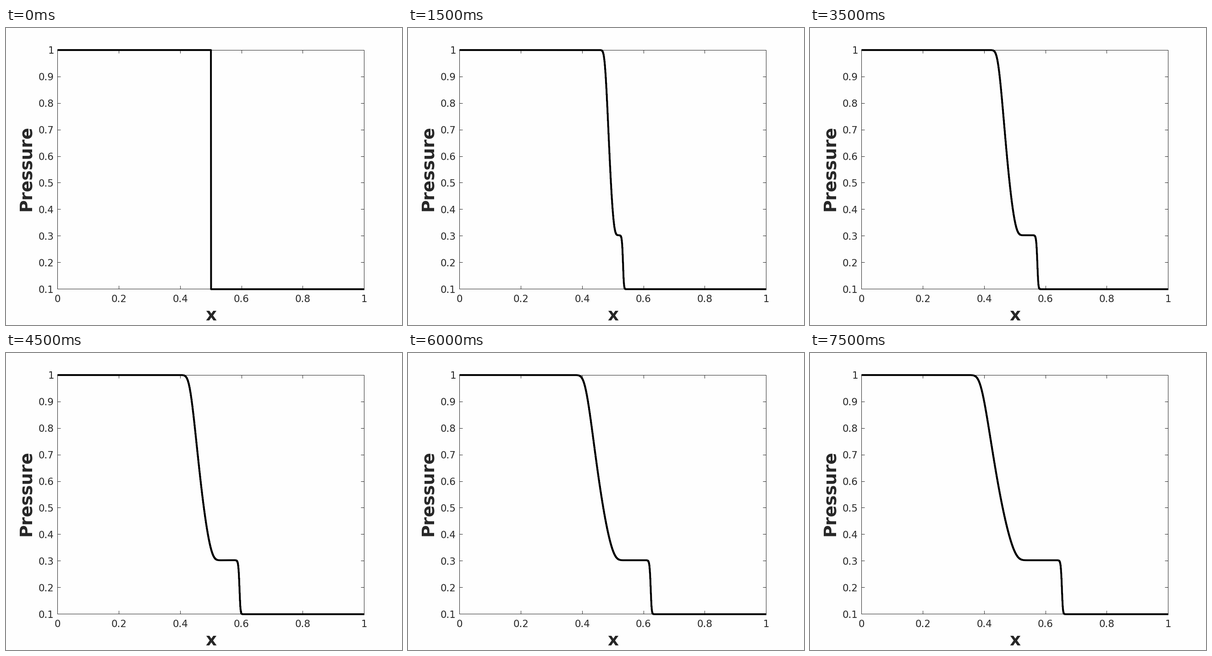
These frames come from a looping animation (864x648 px, 8 s). A matplotlib script:

```python
import numpy as np
import matplotlib.pyplot as plt
from matplotlib.animation import FuncAnimation

W, H, DPI = 864, 648, 96
PX = 72 / DPI
LEFT, RIGHT, TOP, BOTTOM = 112.3, 781.9, 48.1, 569.9
INK = "#262626"
PAPER = "#fefefe"
FRAMES, INTERVAL = 16, 500

GAMMA = 1.4
CELLS, CFL, STEPS = 2000, 0.5, 50

plt.rcParams["font.family"] = "DejaVu Sans"
fig = plt.figure(figsize=(W / DPI, H / DPI), dpi=DPI, facecolor=PAPER)
ax = fig.add_axes([0, 0, 1, 1])
ax.set_xlim(0, W)
ax.set_ylim(H, 0)
ax.axis("off")


def to_x(x):
    return LEFT + (RIGHT - LEFT) * np.asarray(x)


def to_y(p):
    return BOTTOM - (BOTTOM - TOP) * (np.asarray(p) - 0.1) / 0.9


def stroke(xs, ys):
    """Hairline on whole pixel rows and columns."""
    ax.plot(np.floor(xs) + 0.2, np.floor(ys) + 0.2, color=INK, lw=PX,
            solid_capstyle="butt", snap=True)


def label(x, y, text, size, **kw):
    ax.text(x, y, text, fontsize=size * PX, color=INK, ha="left",
            va="baseline", **kw)


def number_width(text, size):
    return size * (0.636 * len(text) - 0.318 * text.count("."))


def draw_axes(size=21.33, tick=7):
    for x in (LEFT, RIGHT):
        stroke([x, x], [TOP, BOTTOM])
    for y in (TOP, BOTTOM):
        stroke([LEFT, RIGHT], [y, y])
    for v in np.linspace(0, 1, 6):
        x, text = to_x(v), f"{v:.1g}"
        stroke([x, x], [BOTTOM, BOTTOM - tick])
        stroke([x, x], [TOP, TOP + tick])
        label(x - number_width(text, size) / 2, 598, text, size)
    for v in np.linspace(0.1, 1, 10):
        y, text = to_y(v), f"{v:.1g}"
        stroke([LEFT, LEFT + tick], [y, y])
        stroke([RIGHT, RIGHT - tick], [y, y])
        label(104.9 - number_width(text, size), y + 7.9, text, size)
    label(435, 638, "x", 37.33, weight="bold")
    label(54.5, 399, "Pressure", 37.33, weight="bold", rotation=90,
          rotation_mode="anchor")


def shock_tube():
    """Pressure snapshots of a shock tube, Lax-Friedrichs scheme."""
    x = np.linspace(0, 1, CELLS + 1)
    dx = 1 / CELLS
    left = x <= 0.5
    rho = np.where(left, 1, 0.125)
    p = np.where(left, 1, 0.1)
    state = np.array([rho, 0 * x, p / (GAMMA - 1)])
    shots = [p]
    for step in range(1, STEPS * (FRAMES - 1) + 1):
        rho, mom, energy = state
        u = mom / rho
        p = (GAMMA - 1) * (energy - mom * u / 2)
        flux = np.array([mom, mom * u + p, (energy + p) * u])
        ratio = CFL / np.max(np.abs(u) + np.sqrt(GAMMA * p / rho))
        state[:, 1:-1] = ((state[:, 2:] + state[:, :-2]) / 2
                          - ratio / 2 * (flux[:, 2:] - flux[:, :-2]))
        if step % STEPS == 0:
            rho, mom, energy = state
            shots.append((GAMMA - 1) * (energy - mom ** 2 / rho / 2))
    return x, shots


draw_axes()
grid, pressure = shock_tube()
curve, = ax.plot([], [], color="black", lw=4 * PX, solid_capstyle="butt",
                 solid_joinstyle="round", snap=False, zorder=5)


def update(i):
    curve.set_data(to_x(grid), to_y(pressure[i]))
    return curve,


anim = FuncAnimation(fig, update, frames=FRAMES, interval=INTERVAL,
                     repeat=True, repeat_delay=0)
plt.show()
```
